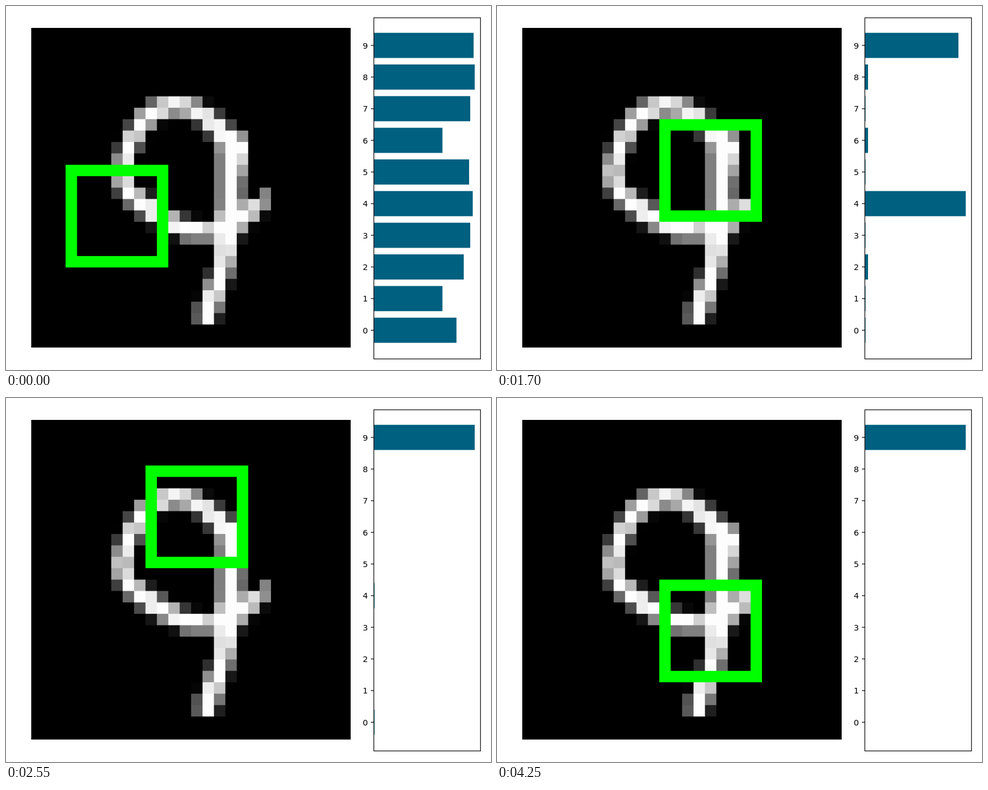
An HTML page with a canvas that plays this animation: 864 px wide and 648 px high, repeating every 5.1 s.

```html
<!DOCTYPE html>
<html lang="en">
<head>
<meta charset="utf-8">
<title>Glimpses of a handwritten nine</title>
<style>
  html, body { margin: 0; width: 100%; height: 100%; overflow: hidden; background: #fff; }
  canvas { display: block; }
</style>
</head>
<body>
<canvas id="stage" width="864" height="648"></canvas>
<script>
const STEP = 850;
const CELLS = 28;
const GLIMPSE = 9;
const FULL_BAR = 180;

// Pen shape in cell units: outer contour, then the hole of the loop.
const nine = new Path2D(`
  M7.2 12.8 C7.5 10.8 8.9 6 12.5 6 C15 6 16.2 7.6 17.5 8.8
  L19 9.8 V10.8 L18.35 14 L18.6 16 L19 15.2 L20 15 V14 H20.5 L20.6 16 H20.3
  L18.2 18 L17.6 21 L16 26 H14.8 L14.5 25 L16.1 20.8 L16.15 18.5 H13.5
  C11 17.4 7.3 15.6 7.2 12.8 Z
  M12.5 7.55 C10.2 7.7 8.8 11 8.7 13 C8.8 14.5 10.3 14.4 13.2 16.8
  L16 17.2 L16.5 15.8 V10.5 C16.2 9.8 14.6 7.5 12.5 7.55 Z`);

// Each glimpse leaves fewer digits in play: `rest` holds for all not named.
const steps = [
  { box: [3, 12], rest: 172, bars: { 0: 147.5, 1: 122.5, 2: 160.5, 4: 176.5, 5: 170, 6: 122.5, 8: FULL_BAR, 9: 178 } },
  { box: [11, 13], rest: 3.7, bars: { 2: 12.5, 4: 175.5, 6: 12.5, 8: 12.5, 9: FULL_BAR } },
  { box: [12, 8], rest: 1.5, bars: { 2: 6, 4: FULL_BAR, 6: 6, 8: 6, 9: 167 } },
  { box: [10, 4], rest: 0, bars: { 0: 1.5, 4: 1.5, 9: FULL_BAR } },
  { box: [10, 6], rest: 0, bars: { 0: 1.5, 4: 1.5, 9: FULL_BAR } },
  { box: [12, 14], rest: 0, bars: { 9: FULL_BAR } },
];

const ctx = document.getElementById("stage").getContext("2d");

function makeSquare(size) {
  const canvas = document.createElement("canvas");
  canvas.width = canvas.height = size;
  return canvas.getContext("2d");
}

const grid = makeSquare(CELLS);
const enlarged = makeSquare(CELLS * 20);
enlarged.imageSmoothingEnabled = false;

// Antialiasing on the coarse grid gives the grey cells along the contour.
function drawDigit([x, y]) {
  grid.fillStyle = "#000";
  grid.fillRect(0, 0, CELLS, CELLS);
  grid.fillStyle = "#fdfdfd";
  grid.fill(nine, "evenodd");
  grid.strokeStyle = "#0f0";
  grid.strokeRect(x + 0.5, y + 0.5, GLIMPSE - 1, GLIMPSE - 1);
  enlarged.drawImage(grid.canvas, 0, 0, CELLS * 20, CELLS * 20);
  ctx.drawImage(enlarged.canvas, 45.2, 38.9, 569.1, 568.7);
}

function drawChart({ bars, rest }) {
  ctx.font = '14.5px "DejaVu Sans", sans-serif';
  ctx.textAlign = "right";
  ctx.lineWidth = 1.2;
  for (let n = 0; n < 10; n++) {
    const y = 577.2 - n * 56.34;
    ctx.fillStyle = "#006080";
    ctx.fillRect(655, y - 22.4, bars[n] ?? rest, 44.8);
    ctx.fillStyle = "#000";
    ctx.fillText(n, 644.7, y + 5.4);
    ctx.fillRect(650, y - 0.6, 5, 1.2);
  }
  ctx.strokeRect(655.3, 21, 190, 607.3);
}

function draw() {
  const step = steps[Math.floor(performance.now() / STEP) % steps.length];
  ctx.fillStyle = "#fff";
  ctx.fillRect(0, 0, 864, 648);
  drawDigit(step.box);
  drawChart(step);
  requestAnimationFrame(draw);
}
draw();
</script>
</body>
</html>
```
